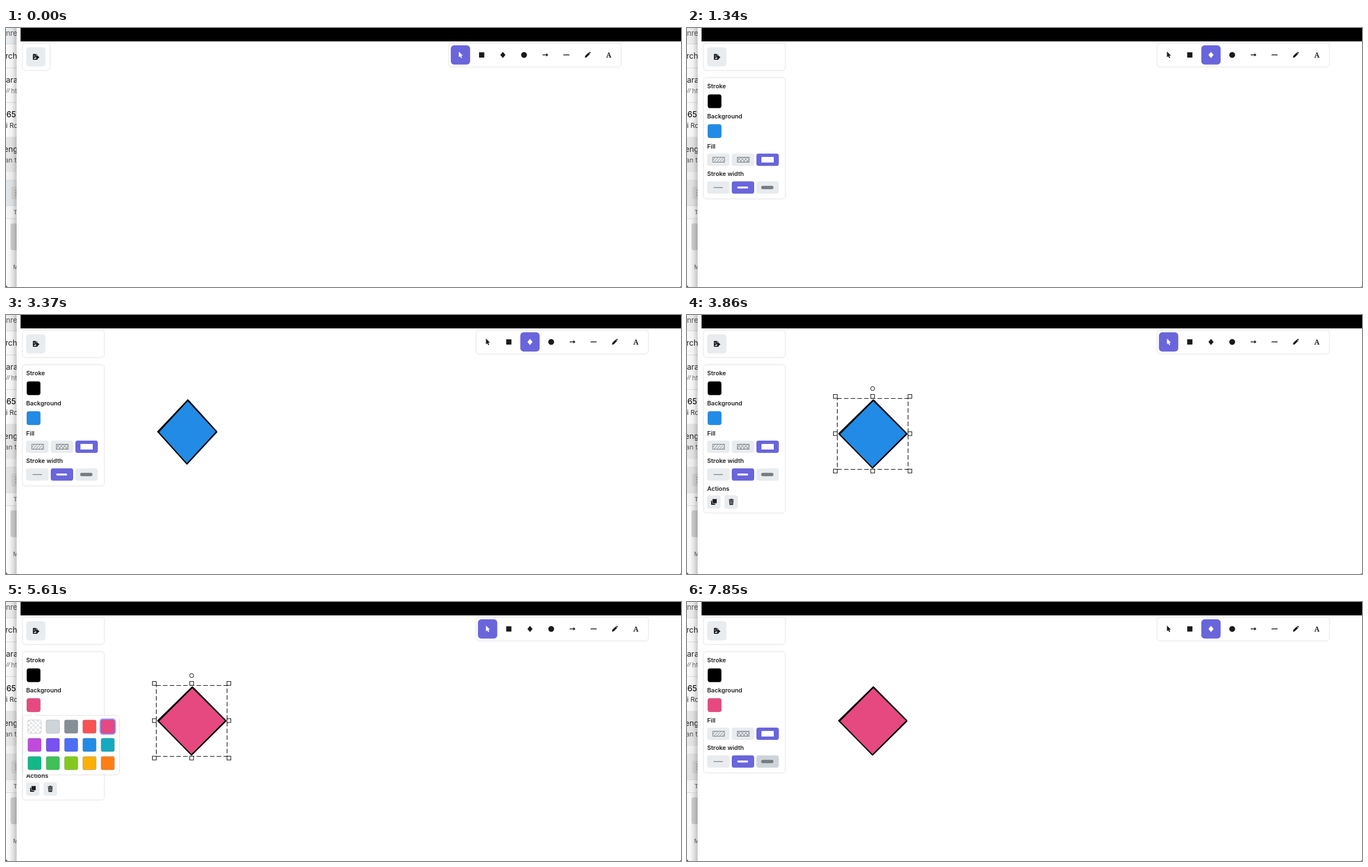
An HTML page for the animation above (8 s loop, 1206 by 464 pixels).

```html
<!DOCTYPE html>
<html lang="en">
<head>
<meta charset="utf-8">
<title>Drawing a diamond</title>
<style>
  html, body { margin: 0; width: 100%; height: 100%; overflow: hidden; background: #fff; }
  svg { display: block; }
  text { font-family: Inter, "Open Sans", sans-serif; }
  .island { fill: #fff; filter: drop-shadow(0 .5px 1.6px rgba(0, 0, 0, .22)); }
  .label { font-size: 10.8px; font-weight: 600; fill: #222; }
  .btn { fill: #e9ecef; }
  .on > .btn { fill: #6965db; }
  .hover > .btn { fill: #ced4da; }
  .on.hover > .btn { fill: #5b57d1; }
  .tool { fill: #1b1b1f; stroke: #1b1b1f; stroke-width: 0; }
  .tool > .btn { fill: none; stroke: none; }
  .tool.hover > .btn { fill: #e0dffb; }
  .tool.on { fill: #fff; stroke: #fff; }
  .tool.on > .btn { fill: #6965db; }
  .line { fill: none; stroke-width: 1.5; stroke-linecap: round; }
  .swatch { stroke: rgba(120, 130, 140, .35); }
</style>
</head>
<body>
<svg id="stage" width="1206" height="464" viewBox="0 0 1206 464">
  <defs>
    <linearGradient id="shade">
      <stop offset="0" stop-color="#000" stop-opacity=".01"/>
      <stop offset=".55" stop-color="#000" stop-opacity=".05"/>
      <stop offset="1" stop-color="#000" stop-opacity=".2"/>
    </linearGradient>
    <pattern id="hatch" width="5" height="9" patternUnits="userSpaceOnUse" x="46" y="231.5">
      <path d="M-3 9L5 0M2 9L10 0" stroke="#777c80"/>
    </pattern>
    <pattern id="cross" width="6" height="9" patternUnits="userSpaceOnUse" x="90" y="231.5">
      <path d="M-2 9L6 0M0 0L8 9M-6 0L2 9M4 9L12 0" stroke="#777c80"/>
    </pattern>
    <pattern id="checks" width="8" height="8" patternUnits="userSpaceOnUse" x="39" y="211">
      <path fill="#fff" d="M0 0h8v8H0z"/><path fill="#e6e6e6" d="M0 0h4v4H0zM4 4h4v4H4z"/>
    </pattern>
    <filter id="glow" x="-50%" y="-50%" width="200%" height="200%"><feGaussianBlur stdDeviation="1.3"/></filter>
  </defs>

  <!-- Window behind, clipped to a strip -->
  <svg width="19" height="464">
    <path fill="#fff" d="M0 0h19v464H0z"/>
    <path id="tint1" d="M0 0h19v28H0z"/>
    <path fill="#ebebeb" d="M0 195h19v63H0z"/>
    <path fill="#f8f8f8" d="M0 258h19v14H0z"/>
    <path stroke="#ececec" d="M0 270l10-11M6 271l11-12M12 271l10-11"/>
    <path id="tint2" d="M0 272h19v46H0z"/>
    <path fill="#fafafa" d="M0 318h19v23H0z"/>
    <path fill="#f6f6f6" d="M8 342h11v122H8z"/>
    <path stroke="#dedede" d="M0 28.5h19M0 71.5h19M0 133.5h19M0 272.5h19M0 318.5h19M0 341.5h19"/>
    <rect x="9" y="284" width="20" height="23" rx="4" fill="#dcdcdc"/>
    <path stroke="#888" stroke-width="1.5" stroke-dasharray="1.5 3" d="M17.5 290v11"/>
    <rect x="8" y="350" width="24" height="48" rx="4" fill="#d2d2d2"/>
    <g id="mail" text-anchor="end"></g>
    <path stroke="#777" d="M0 116l4-8M3 116l4-8"/>
    <path fill="url(#shade)" d="M0 0h19v464H0z"/>
    <path fill="#555" d="M0 461l3 3H0z"/>
  </svg>
  <path fill="#000" d="M26 0h1180v24H26z"/>
  <path fill="#666" d="M1206 462v2h-2z"/>

  <rect id="top" class="island" x="30" y="27.5" width="48" height="48" rx="5"/>
  <rect class="btn" x="36" y="34.5" width="34.5" height="34.5" rx="5"/>
  <path fill="#1b1b1f" d="M48 47.5q0-1 1-1h4.500v3h3v2h-4v2h4v2.500q0 1-1 1h-6.500q-1 0-1-1zM54.300 46.500l2.200 2.200h-2.200zM56 49.300l3.800 3.200-3.800 3.200v-2.200h-2.500v-2h2.500z"/>
  <path fill="#e9ecef" d="M49.300 55.300l1.700-2.200 1 1 1-1 1.500 2.200z"/>
  <circle cx="50.400" cy="50.200" r=".9" fill="#e9ecef"/>

  <g id="bar"><rect class="island" x="792" y="27.500" width="306.500" height="41.500" rx="5"/></g>

  <g id="panel">
    <rect id="sheet" class="island" x="30" y="89.500" width="145" rx="5"/>
    <text class="label" x="36" y="108">Stroke</text>
    <rect class="swatch" x="37" y="119" width="24.500" height="24.500" rx="4"/>
    <text class="label" x="36" y="161.700">Background</text>
    <rect id="back" class="swatch" x="37" y="172.500" width="24.500" height="24.500" rx="4"/>
    <text class="label" x="36" y="215.500">Fill</text>
    <text class="label" x="36" y="265">Stroke width</text>
    <g id="choices"></g>
    <path d="M46 231.500h21l-3 9H46z" fill="none"/>
    <rect x="46" y="231.500" width="21" height="9" fill="url(#hatch)" stroke="#777c80"/>
    <rect x="90" y="231.500" width="21" height="9" fill="url(#cross)" stroke="#777c80"/>
    <rect x="133" y="231" width="22" height="10" rx=".5" fill="#fff"/>
    <g stroke-linecap="round">
      <path stroke="#868b90" stroke-width="1.500" d="M48 285.700h15.500"/>
      <path stroke="#fff" stroke-width="3.600" d="M91.500 285.700h16"/>
      <path stroke="#777c80" stroke-width="6" d="M135.500 285.700h16"/>
    </g>
    <g id="actions">
      <text class="label" x="36" y="314.500">Actions</text>
      <rect class="btn" x="36" y="323" width="24" height="24" rx="4"/>
      <rect class="btn" x="67" y="323" width="24" height="24" rx="4"/>
      <rect x="43" y="332.500" width="7.500" height="7.500" rx="1" fill="#1b1b1f"/>
      <rect x="45.200" y="329.300" width="8.300" height="8.300" rx="1" fill="#1b1b1f" stroke="#e9ecef" stroke-width=".8"/>
      <path fill="#1b1b1f" d="M74.700 330.200h2.500l.6-.9h2.700l.6.900h2.500v1.300h-8.900zM75.300 332.300h7.700l-.5 7q-.1.900-1 .9h-4.700q-.9 0-1-.9z"/>
      <path stroke="#e9ecef" stroke-width=".7" d="M77.300 333.500v5.200M79.150 333.500v5.200M81 333.500v5.200"/>
    </g>
  </g>

  <g id="shape" stroke-linejoin="round" stroke-linecap="round">
    <path id="body"/>
    <path id="edge" fill="none" stroke="#000" stroke-width="1.800"/>
  </g>
  <g id="selection" fill="#fff" stroke="#000">
    <rect x="268.500" y="149.500" width="126.500" height="127" fill="none" stroke-width="1.100" stroke-dasharray="8 4"/>
    <circle cx="331.700" cy="131.800" r="3.600"/>
  </g>
  <g id="picker">
    <g class="island">
      <path d="M43 205l6-8 6 8z"/>
      <rect x="30.500" y="204" width="171.500" height="105" rx="4"/>
    </g>
    <rect id="focus" width="28" height="28" rx="5" fill="#7468f0" filter="url(#glow)"/>
  </g>
</svg>
<script>
const NS = 'http://www.w3.org/2000/svg';
const LOOP = 8000, STEP = 70;
const BLUE = '#228be6', PINK = '#e64980';
const PALETTE = ['url(#checks)', '#ced4da', '#868e96', '#fa5252', PINK,
  '#be4bdb', '#7950f2', '#4c6ef5', BLUE, '#15aabf',
  '#12b886', '#40c057', '#82c91e', '#fab005', '#fd7e14'];
const $ = id => document.getElementById(id);

function add(parent, tag, attrs, text) {
  const el = document.createElementNS(NS, tag);
  for (const k in attrs) el.setAttribute(k, attrs[k]);
  if (text) el.textContent = text;
  return parent.appendChild(el);
}
const show = (id, on) => $(id).style.display = on ? '' : 'none';
const set = (id, name, value) => $(id).setAttribute(name, value);
const between = (t, a, b) => t >= a && t < b;

// Clipped list: text, right edge, baseline, size, weight, colour
[['Unre', 20, 14, 13, 400, '#555'], ['Arch', 20, 55, 14, 400, '#222'],
 ['Kara', 21, 98, 14, 400, '#222'], ['ht', 20, 117, 12, 400, '#777'],
 ['+65', 18, 160, 14, 500, '#111'], ['Hi Ro', 21, 179, 12, 400, '#333'],
 ['Seng', 21, 222, 14, 400, '#222'], ['an t', 19, 241, 12, 400, '#555'],
 ['T', 20, 334, 10, 600, '#777'], ['M', 22, 432, 10, 500, '#777']
].forEach(([s, x, y, size, weight, fill]) =>
  add($('mail'), 'text', { x, y, 'font-size': size, 'font-weight': weight, fill }, s));

// Toolbar icons, centred on 0,0
const ICONS = [
  { d: 'M-3-6L4.300 1.300H1L2.800 4.800 1 5.700-.7 2.200-3 4.400z' },
  { d: 'M-4-4.700H4Q4.700-4.700 4.700-4V4Q4.700 4.700 4 4.700H-4Q-4.700 4.700-4.700 4V-4Q-4.700-4.700-4-4.700z' },
  { d: 'M0-5.500L4.600 0 0 5.500-4.600 0z' },
  { d: 'M-5.200 0a5.200 5.200 0 1 0 10.400 0a5.200 5.200 0 1 0-10.400 0z' },
  { d: 'M-4.300 0H3.300M2.200-1.800L4.200 0 2.200 1.800', class: 'line' },
  { d: 'M-4.800 0H4.800', class: 'line' },
  { d: 'M-5 5L-4.300 1.600 1.700-4.200 4.200-1.700-1.700 4.300zM2.300-4.800L3.100-5.400Q3.800-5.800 4.500-5.200L5.200-4.500Q5.700-3.800 5.200-3.100L4.700-2.400z' }
];
const tools = Array.from({ length: 8 }, (_, i) => {
  const g = add($('bar'), 'g', { class: 'tool', transform: `translate(${812 + i * 37.86} 48.2)` });
  add(g, 'rect', { class: 'btn', x: -17.3, y: -17.2, width: 34.5, height: 34.5, rx: 6 });
  if (ICONS[i]) add(g, 'path', ICONS[i]);
  else add(g, 'text', { y: 4.4, 'text-anchor': 'middle', 'font-size': 12.5, 'font-weight': 700,
    style: 'font-family: "Noto Serif", serif' }, 'A');
  return g;
});

const choices = Array.from({ length: 6 }, (_, i) => {
  const g = add($('choices'), 'g');
  add(g, 'rect', { class: 'btn', x: 36 + i % 3 * 44, y: i < 3 ? 225 : 274.700, width: 40, height: 22, rx: 4 });
  return g;
});

for (const x of [265, 331.7, 398.3])
  for (const y of [145.8, 212.5, 279.6])
    if (x !== 331.7 || y !== 212.5)
      add($('selection'), 'rect', { x: x - 3.4, y: y - 3.4, width: 6.8, height: 6.8 });

const cell = i => [51 + i % 5 * 32.7, 223.3 + Math.floor(i / 5) * 32.7];
PALETTE.forEach((fill, i) => {
  const [x, y] = cell(i);
  add($('picker'), 'rect', { class: 'swatch', x: x - 12, y: y - 12, width: 24, height: 24, rx: 3, fill });
});

function mark(list, active, hovered) {
  list.forEach((el, i) => {
    el.classList.toggle('on', i === active);
    el.classList.toggle('hover', i === hovered);
  });
}

// Hand-drawn diamond: two slightly different passes round the outline
function drawDiamond(w, h) {
  const s = Math.min(1, w / 40), x = 271.5, y = 152.5;
  const pt = (u, v, dx, dy) => `${x + w * u + dx * s} ${y + h * v + dy * s}`;
  const path = (...pts) => 'M' + pts.join('L');
  set('body', 'd', path(pt(.5, 0, .5, 0), pt(1, .5, 0, 0), pt(.5, 1, -.5, 0), pt(0, .5, 0, 0)) + 'z');
  set('edge', 'd',
    path(pt(.5, 0, 0, 0), pt(1, .5, .3, .2), pt(.5, 1, -.6, .7), pt(0, .5, -.6, -.5), pt(.5, 0, .8, -.5)) +
    path(pt(.5, 0, 1.800, .2), pt(1, .5, 0, -.9), pt(.5, 1, -.8, 0), pt(0, .5, 1, .4), pt(.5, 0, .6, .8)));
}

function grow(t) {
  const k = Math.min(1, Math.max(0, Math.floor((t - 2880) / STEP) / 10));
  const e = Math.pow(k, .74);
  const p = e * e * (3 - 2 * e);
  const w = 1.5 + 119.700 * p;
  drawDiamond(w, w * (1 + .74 * p * (1 - p)));
}

function render(t) {
  const opened = t >= 1060;
  const selected = between(t, 3650, 6940);
  const pink = t >= 5610;
  const color = pink ? PINK : BLUE;

  set('tint1', 'fill', t < 500 ? '#eef2f4' : '#f3f3f3');
  set('tint2', 'fill', t < 500 ? '#e6eaec' : '#e9e9e9');
  set('top', 'width', opened ? 145 : 48);
  set('bar', 'transform', `translate(${opened ? 48.5 : 0} 0)`);
  mark(tools, opened && !selected ? 2 : 0, between(t, 850, 1060) ? 2 : -1);

  show('panel', opened);
  show('actions', selected);
  set('sheet', 'height', selected ? 264.500 : 216);
  set('back', 'fill', color);
  const fillHover = between(t, 3790, 3860) || between(t, 7500, 7710);
  mark(choices.slice(0, 3), 2, fillHover ? 2 : -1);
  mark(choices.slice(3), 1, t >= 7850 ? 2 : -1);

  show('shape', t >= 2880);
  set('body', 'fill', color);
  grow(t);
  show('selection', selected);

  show('picker', between(t, 4770, 6870));
  const [x, y] = cell(PALETTE.indexOf(color));
  set('focus', 'x', x - 14);
  set('focus', 'y', y - 14);
}

function tick() {
  render(performance.now() % LOOP);
  requestAnimationFrame(tick);
}
tick();
</script>
</body>
</html>
```
